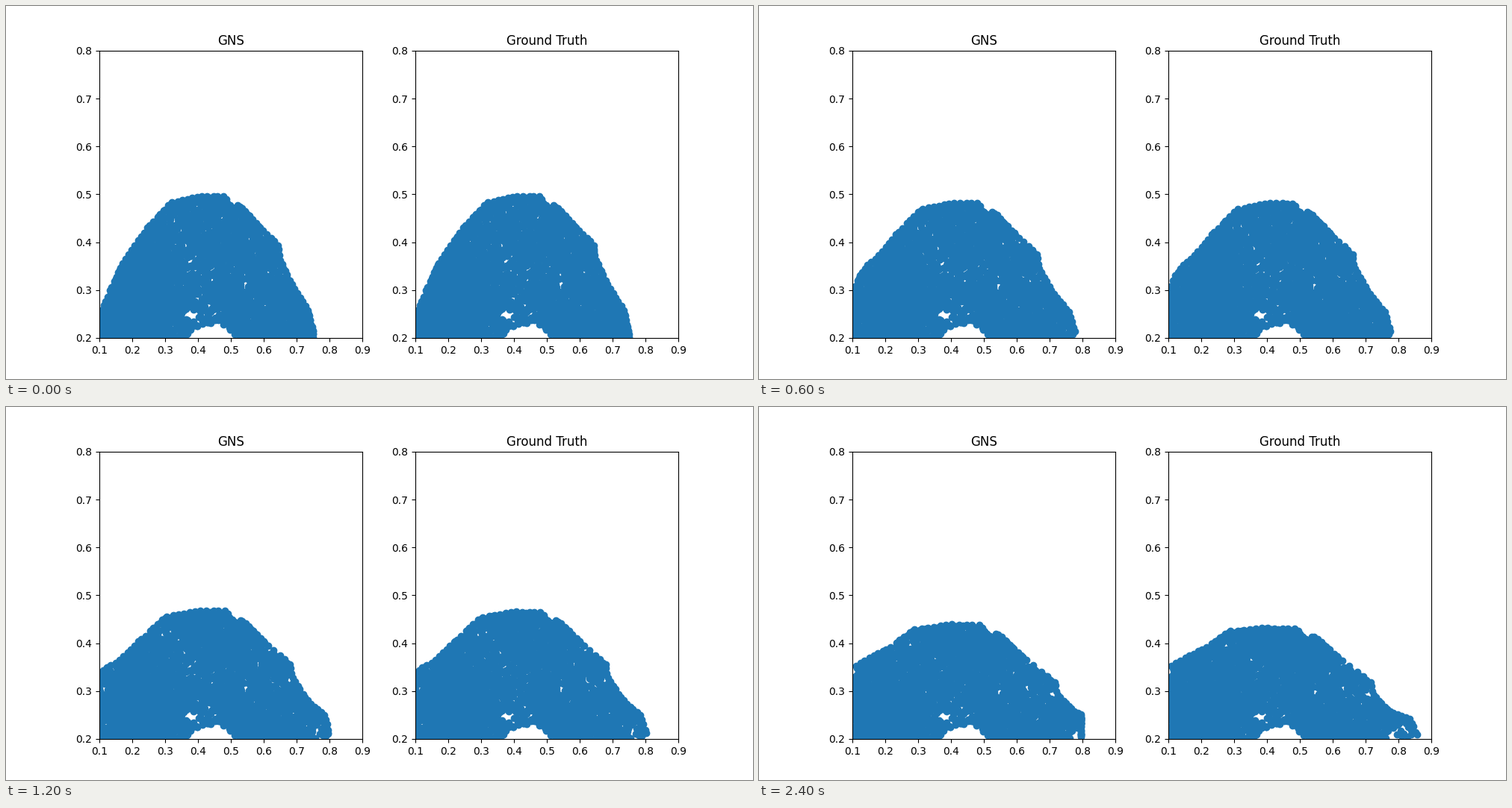
Write a matplotlib script that moves like this. It is 1000 px wide and 500 px high and loops after 2500 ms.

```python
import numpy as np
import matplotlib.pyplot as plt
from matplotlib.animation import FuncAnimation

FRAMES, INTERVAL = 25, 100
LEFT, FLOOR = 125, 445   # lower left corner of the first panel, in pixels
STOP_X = 431             # the predicted pile spreads no further than this

# Key points of the pile's surface at the start, in pixels
RIM_X = [126, 139, 157, 190, 220, 258, 292, 302, 312, 345, 364, 366, 384, 404, 412]
RIM_Y = [415, 382, 343, 296, 264, 255, 255, 270, 266, 302, 320, 338, 376, 407, 440]

# How far the surface travels in one loop, by starting x
FLOW_X = [125, 147, 163, 195, 237, 292, 345, 364, 390, 412]
FLOW_DX = [-54, -54, -35, -21, -10, 4, 14, 32, 37, 48]
FLOW_DY = [0, -4, 13, 33, 36, 37, 38, 48, 25, 3]

rng = np.random.default_rng(7)


def bell(x, mid, width):
    return np.exp(-((x - mid) / width) ** 2)


def rim_y(x):
    return np.interp(x, RIM_X, RIM_Y)


def rim(step=7):
    """Particles along the surface at nearly even distances."""
    length = np.r_[0, np.cumsum(np.hypot(np.diff(RIM_X), np.diff(RIM_Y)))]
    s = np.arange(0, length[-1], step)
    s = s + rng.uniform(-1.5, 1.5, s.size)
    return np.column_stack([np.interp(s, length, RIM_X),
                            np.interp(s, length, RIM_Y)])


def fill(count, right):
    """Particles under the surface, sparser in the core and over the hollow."""
    x = rng.uniform(LEFT, right, count)
    y = rng.uniform(250, 452, count)
    core = bell(x, 265, 42) * bell(y, 335, 45)
    loose = bell(x, 247, 20) * bell(y, 414, 15)
    hollow = y > 425 + 18 * ((x - 274) / 35) ** 2
    keep = rng.random(count) > 0.42 * core + 0.72 * loose
    return np.column_stack([x, y])[keep & ~hollow & (y > rim_y(x) + 1)]


x0, y0 = np.vstack([rim(), fill(4500, 412), fill(800, 195)]).T
height = np.clip((FLOOR - y0) / np.maximum(FLOOR - rim_y(x0), 1), 0, 1)
weight = height ** (1 + 1.2 * bell(x0, 275, 70))   # deep particles rest
dx = weight * np.interp(x0, FLOW_X, FLOW_DX)
dy = weight * np.interp(x0, FLOW_X, FLOW_DY)
bend = 0.9 * bell(x0, 165, 25)                     # the left flank slows down
sag = 5 * weight * bell(x0, 275, 55)


def positions(i, predicted):
    t = i / (FRAMES - 1)
    x = x0 + dx * t
    y = y0 + dy * (t + bend * t * (1 - t))
    if predicted:
        x = np.minimum(x, STOP_X)
    else:
        y = y + sag * t * t
    return 0.1 + 0.8 * (x - LEFT) / 352.27, 0.2 + 0.6 * (FLOOR - y) / 385


fig, axes = plt.subplots(1, 2, figsize=(10, 5), dpi=100)
dots = []
for ax, title in zip(axes, ("GNS", "Ground Truth")):
    ax.set_title(title)
    ax.set_xlim(0.1, 0.9)
    ax.set_ylim(0.2, 0.8)
    dots += ax.plot([], [], "o", color="#1f77b4")


def draw(i):
    for line, predicted in zip(dots, (True, False)):
        line.set_data(*positions(i, predicted))
    return dots


anim = FuncAnimation(fig, draw, frames=FRAMES, interval=INTERVAL,
                     init_func=lambda: draw(0), repeat=True, repeat_delay=0)
plt.show()
```
